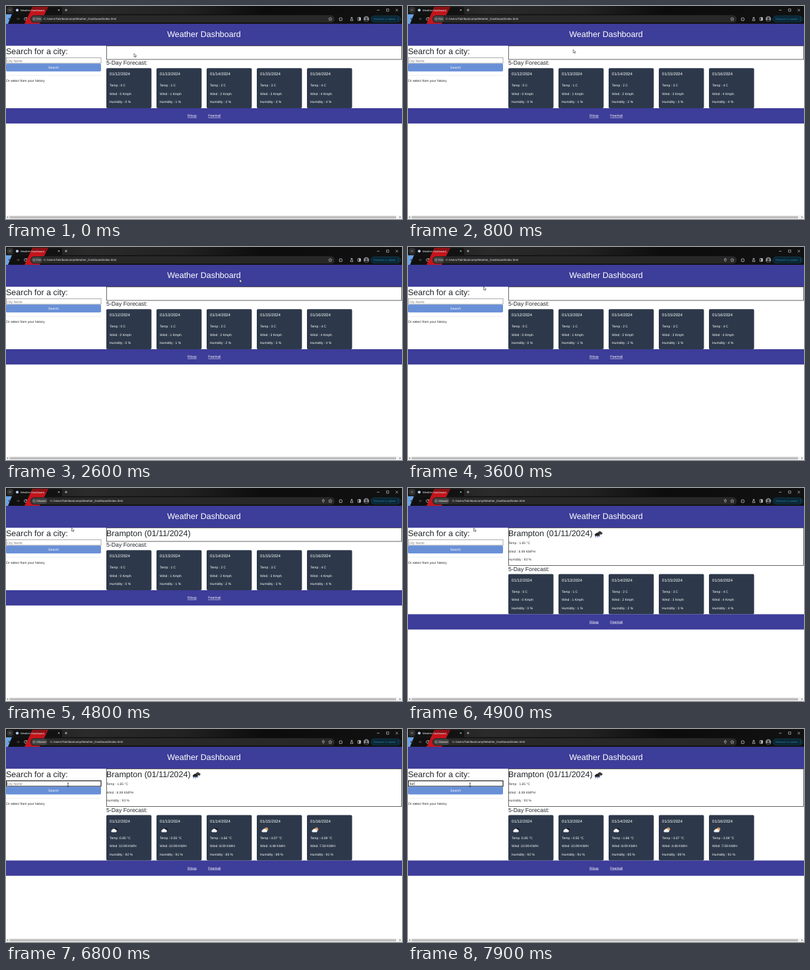
An HTML page that plays this animation: 600 by 323 pixels, repeating every 8 s.

```html
<!DOCTYPE html>
<html lang="en">
<head>
<meta charset="utf-8">
<title>Weather Dashboard</title>
<style>
  html, body { margin: 0; width: 100%; height: 100%; overflow: hidden; background: #fff; }
  svg { position: absolute; inset: 0; width: 100%; height: 100%; }
  text { font-family: "Liberation Sans", Arial, sans-serif; text-rendering: geometricPrecision; white-space: pre; }
</style>
</head>
<body>
<svg id="screen" viewBox="0 0 600 323"></svg>
<svg viewBox="0 0 600 323">
  <path id="arrow" d="M0 0V5.2L1.3 4.1L2.2 6L3.1 5.6L2.2 3.8H3.8Z" fill="#fff" stroke="#111" stroke-width=".5"/>
  <path id="beam" d="M-1.1 -2.6H1.1M0 -2.6V2.6M-1.1 2.6H1.1" fill="none" stroke="#111" stroke-width=".7"/>
</svg>
<script>
const LOOP = 8000;
const INDIGO = '#3d3d9a', CARD = '#2d394a';

// When each part of the page changes, in ms
const AT = { pin: 2800, allowed: 4400, title: 4700, current: 4900, forecast: 5000, focus: 6400 };
const TYPED = [[7000, 'T'], [7300, 'To'], [7600, 'Tor']];

// Pointer stops: time, x, y
const STOPS = [[0, 194, 72], [500, 194, 72], [1500, 453, 44], [2100, 453, 44], [3500, 114.5, 60],
  [3800, 114.5, 60], [4600, 99.5, 60.5], [5000, 99.5, 60.5], [5700, 95, 88], [6000, 95, 88],
  [6400, 94, 84.5], [8000, 94, 84.5]];

const DAYS = [
  ['0.85', '10.99', 92], ['-0.55', '10.99', 91], ['-1.66', '8.09', 85],
  ['-3.07', '4.48', 89], ['-3.09', '7.59', 91]];

const box = (x, y, w, h, fill, more = '') =>
  `<rect x="${x}" y="${y}" width="${w}" height="${h}" fill="${fill}" ${more}/>`;
const label = (x, y, s, size, fill, more = '') =>
  `<text x="${x}" y="${y}" font-size="${size}" fill="${fill}" ${more}>${s}</text>`;
const shape = (d, fill) => `<path d="${d}" fill="${fill}"/>`;
const line = (d, color = '#ddd', w = .7) =>
  `<path d="${d}" fill="none" stroke="${color}" stroke-width="${w}"/>`;
const dot = (x, y, r, fill, more = '') =>
  `<circle cx="${x}" cy="${y}" r="${r}" fill="${fill}" ${more}/>`;
const cloud = (x, y, k, fill) => `<path transform="translate(${x} ${y}) scale(${k})" fill="${fill}"
  d="M2 6A2 2 0 0 1 2 2.3A3 3 0 0 1 7.3 2A2.1 2.1 0 0 1 8 6Z"/>`;

function browser(t) {
  const allowed = t >= AT.allowed, shift = allowed ? 10 : 0;
  return `<defs><linearGradient id="strip">
      <stop offset="0" stop-color="#161616"/><stop offset=".2" stop-color="#2b2b2b"/>
      <stop offset=".45" stop-color="#222"/><stop offset=".65" stop-color="#0c0c0c"/>
      <stop offset="1" stop-color="#111"/></linearGradient></defs>`
    + box(0, 0, 600, 27, '#101010') + box(0, 0, 600, 12.5, 'url(#strip)')
    + shape('M12 12.5V4Q12 1.5 15 1.5H82Q85 1.5 85 4V12.5Z', '#121212')
    + shape('M40 1.5H64L51 27H28Z', '#c5141b') + shape('M40 1.5H64L61 7H37.5Z', '#8c1015')
    + shape('M0 12.5H9L3 27H0Z', '#6aa5e6')
    + box(1.5, 1.5, 9, 9, '#333', 'rx="3"') + line('M4.7 5.4L6 6.8L7.3 5.4')
    + dot(17, 6.3, 2.1, '#b9cdf0')
    + label(22, 7.8, 'Weather Dashboard', 4, '#f2f2f2')
    + line('M78.8 5L81.2 7.4M81.2 5L78.8 7.4M89 6.2H93M91 4.2V8.2')
    + line('M562 6.3H566M576.5 4.5H580V8H576.5ZM590.4 4.5L594 8.1M594 4.5L590.4 8.1', '#ddd', .6)
    + line('M8.5 19.6H4M6 17.6L4 19.6L6 21.6', '#222')
    + line('M16 19.6H20M18.2 17.6L20.2 19.6L18.2 21.6', '#666')
    + line('M31 18.3A2 2 0 1 0 31.3 20.5M31.4 17V18.8H29.6')
    + box(37, 14, 461, 11.3, '#282828', 'rx="5.6"')
    + box(38.5, 15.2, 16.5 + shift * .75, 8.9, '#444', 'rx="4.4"')
    + dot(42.5, 19.6, 1.5, 'none', 'stroke="#ddd" stroke-width=".5"')
    + label(46, 21.1, allowed ? 'Allowed' : 'File', 4.2, '#e4e4e4')
    + label(57 + shift, 21.2, 'C:/Users/Talir/bootcamp/Weather_Dashboard/index.html', 4.42, '#eee')
    + (t >= AT.pin ? line('M480.8 22.2Q477.5 18 480.8 17.2Q484 18 480.8 22.2', '#ccc', .6)
      + dot(480.8, 18.9, .6, '#ccc') : '')
    + line('M491.3 17.1L492 18.9L494 19L492.5 20.3L493 22.2L491.3 21.1L489.6 22.2L490.1 20.3L488.6 19L490.6 18.9Z', '#ddd', .5)
    + line('M505.2 18.2H506.6Q507.2 16.4 507.9 18.2H509V19.5Q510.6 20 509 20.8V22H505.2Z')
    + line('M522.6 17.4H525M523.1 17.4V19L521.8 22H525.8L524.5 19V17.4')
    + line('M533.2 17.4H537V21.9H533.2Z') + box(535.2, 17.4, 2, 4.5, '#ddd')
    + dot(546, 19.7, 4.2, '#85898d') + dot(546, 18.6, 1.4, '#25282b')
    + shape('M543.2 22.8Q543.4 20.4 546 20.4Q548.6 20.4 548.8 22.8Q546 25 543.2 22.8Z', '#25282b')
    + box(553, 14.8, 45, 9.8, '#0b2735', 'rx="4.9" stroke="#174d67" stroke-width=".5"')
    + label(557, 21, 'Relaunch to update', 3.85, '#2883ae')
    + [18, 19.7, 21.4].map(y => dot(594.5, y, .45, '#4b9bc0')).join('');
}

function searchPanel(t) {
  const focus = t >= AT.focus;
  const typed = TYPED.filter(([at]) => t >= at).map(([, s]) => s).pop() || '';
  const caret = [1.7, 4.8, 7.6, 9.4][typed.length];
  return label(0, 72.6, 'Search for a city:', 12.5, '#212529')
    + box(.4, 78.6, 143.6, 8.3, '#fff', `stroke="${focus ? '#111' : '#777'}" stroke-width="${focus ? 1.1 : .6}"`)
    + (typed ? label(1.7, 84.5, typed, 5, '#111') : label(1.5, 84.5, 'City Name', 5, '#757575'))
    + (focus ? line(`M${caret} 80.2V85.4`, '#111', .5) : '')
    + box(0, 87.2, 144, 12, '#6990d7', 'rx="1.8"')
    + label(72, 95, 'Search', 5, '#fff', 'text-anchor="middle"')
    + box(0, 104.8, 144, .5, '#dcdcdc')
    + label(0, 114.8, 'Or select from your history', 5, '#212529');
}

function currentDay(t) {
  const open = t >= AT.current;
  let s = box(152.3, 60.6, 447.3, open ? 56.9 : 20.4, '#fff', 'stroke="#222" stroke-width=".7"');
  if (t >= AT.title) s += label(152, 72.8, 'Brampton (01/11/2024)', 12.5, '#212529');
  if (open) {
    s += cloud(286.3, 65, .9, '#3c3c40') + cloud(282.2, 67.4, .9, '#222329')
      + line('M285 73L284 74.8M288 73L287 75M291 72L290 73.8', '#3548c0', 1);
    ['Temp : 1.65 °C', 'Wind : 8.99 KMPH', 'Humidity : 93 %']
      .forEach((row, i) => s += label(152, 85.1 + i * 12.5, row, 5, '#333'));
  }
  return s;
}

function dayCard(i, top, loaded) {
  const x = 152 + i * 76, [temp, wind, humidity] = DAYS[i];
  const rows = loaded
    ? [`Temp :${temp} °C`, `Wind :${wind} KM/H`, `Humidity : ${humidity} %`]
    : [`Temp : ${i} C`, `Wind : ${i} Kmph`, `Humidity : ${i} %`];
  let s = box(x, top, 68.4, loaded ? 68.8 : 60.8, CARD, 'rx="1.8"')
    + label(x + 5, top + 11.1, `01/${12 + i}/2024`, 6.2, '#fff');
  if (loaded) {
    s += (i < 3 ? cloud(x + 10.2, top + 19, .75, '#15181d') : dot(x + 14.5, top + 21.4, 2.7, '#d99a63'))
      + cloud(x + 6.6, top + 20, 1, '#f4f4f4');
  }
  rows.forEach((row, n) => s += label(x + 5, top + (loaded ? 36.1 : 28.1) + n * 12.5, row, 5, '#fff'));
  return s;
}

function page(t) {
  const loaded = t >= AT.forecast, top = t >= AT.current ? 130.6 : 94.2;
  const foot = top + (loaded ? 68.8 : 60.8);
  const link = (x, s) => label(x, foot + 13.2, s, 5, '#fff', 'text-decoration="underline"');
  return box(0, 27, 600, 296, '#fff') + browser(t)
    + box(0, 27, 600, 33.3, INDIGO)
    + label(300, 47.2, 'Weather Dashboard', 12.5, '#fff', 'text-anchor="middle"')
    + searchPanel(t) + currentDay(t)
    + label(152, top - 4.8, '5-Day Forecast:', 8.75, '#212529')
    + DAYS.map((_, i) => dayCard(i, top, loaded)).join('')
    + box(0, foot, 600, 23.2, INDIGO) + link(275, 'Rilvop') + link(306.3, 'PeerHall')
    + box(0, 317.5, 600, 5.5, '#f3f3f3') + box(5.5, 318.6, 585.5, 3.4, '#bdbdbd')
    + shape('M3.2 318.8V321.8L1.4 320.3Z', '#666') + shape('M596.4 318.8V321.8L598.2 320.3Z', '#666');
}

function pointer(t) {
  const n = STOPS.findIndex(([at]) => at > t);
  const [t0, x0, y0] = STOPS[n - 1], [t1, x1, y1] = STOPS[n];
  const u = (t - t0) / (t1 - t0), k = u * u * (3 - 2 * u);
  return [x0 + (x1 - x0) * k, y0 + (y1 - y0) * k];
}

const [screenEl, arrow, beam] = ['screen', 'arrow', 'beam'].map(id => document.getElementById(id));
let shown = '';

function draw() {
  const t = performance.now() % LOOP;
  const html = page(t);
  if (html !== shown) screenEl.innerHTML = shown = html;
  const [x, y] = pointer(t);
  const overInput = x < 144 && y > 78;
  for (const el of [arrow, beam]) el.setAttribute('transform', `translate(${x} ${y})`);
  arrow.style.display = overInput ? 'none' : '';
  beam.style.display = overInput ? '' : 'none';
  requestAnimationFrame(draw);
}
draw();
</script>
</body>
</html>
```
